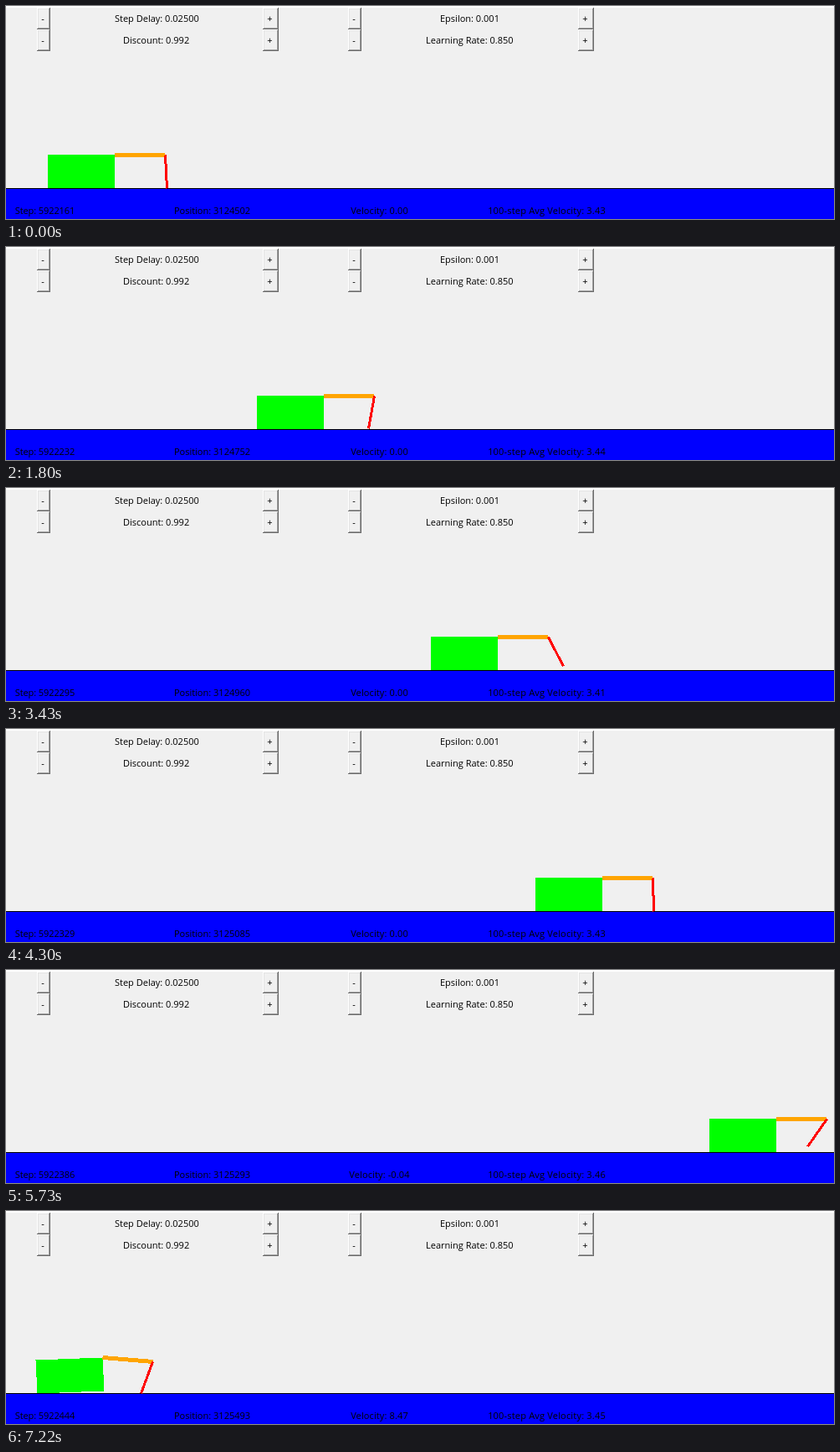
Animation, 990 px wide and 255 px high, one loop 7270 ms. Source, as an HTML page:

```html
<!DOCTYPE html>
<html lang="en">
<head>
<meta charset="utf-8">
<title>Crawling robot</title>
<style>
  html, body { margin: 0; width: 100%; height: 100%; overflow: hidden; background: #f0f0f0; }
  svg { display: block; }
  text { font: 11px "Open Sans", "Noto Sans", sans-serif; fill: #000; white-space: pre; }
  .mid { text-anchor: middle; }
  .crisp { shape-rendering: crispEdges; }
</style>
</head>
<body>
<svg id="stage" width="990" height="255" viewBox="0 0 990 255">
  <rect width="990" height="255" fill="#f0f0f0"/>
  <rect width="990" height="2" fill="#fff"/>
  <g id="buttons" class="crisp"></g>
  <text x="130" y="19">Step Delay: 0.02500</text>
  <text x="519" y="19">Epsilon: 0.001</text>
  <text x="140" y="45">Discount: 0.992</text>
  <text x="502" y="45">Learning Rate: 0.850</text>
  <g class="crisp">
    <rect y="218" width="990" height="37" fill="#00f"/>
    <rect y="218" width="990" height="1"/>
    <!-- just under half a pixel: whole coordinates name pixel centres -->
    <g transform="translate(.49 .49)">
      <polygon id="body" fill="#0f0"/>
      <line id="arm" stroke="#ffa500" stroke-width="5"/>
      <line id="hand" stroke="#f00" stroke-width="3"/>
    </g>
  </g>
  <g class="mid">
    <text id="step" x="46.5" y="249" letter-spacing="-.1"></text>
    <text id="pos" x="246.5" y="249"></text>
    <text id="vel" x="446.5" y="249" letter-spacing=".12"></text>
    <text id="avg" x="646.5" y="249" letter-spacing=".19"></text>
  </g>
</svg>
<script>
const $ = id => document.getElementById(id);
const NS = 'http://www.w3.org/2000/svg';

function add(parent, tag, attrs, text = '') {
  const el = document.createElementNS(NS, tag);
  for (const k in attrs) el.setAttribute(k, attrs[k]);
  el.textContent = text;
  parent.append(el);
}

// Raised buttons
function button(x, y, w, label) {
  const g = $('buttons'), h = 26;
  const box = (near, far, fill) => add(g, 'rect',
    { x: x + near, y: y + near, width: w - near - far, height: h - near - far, fill });
  box(0, 0, '#696969');
  box(0, 1, '#fff');
  box(1, 1, '#a0a0a0');
  box(1, 2, '#e3e3e3');
  box(2, 2, '#f0f0f0');
  add(g, 'text', { x: x + w / 2 - 1, y: y + 17, class: 'mid' }, label);
}
for (const y of [2, 28]) {
  button(37, y, 16, '-');
  button(307, y, 19, '+');
  button(409, y, 16, '-');
  button(684, y, 19, '+');
}

// Robot geometry
const WIDTH = 80, HEIGHT = 40, ARM = 60, HAND = 40;
const GROUND = 218, TRACK = 1004, LEFT = -4;
const FIRST_STEP = 5922161, FIRST_POS = 3124502.4;
const rad = deg => deg * Math.PI / 180;

// One gait cycle: hand swings forward in the air, then pulls with the arm lowered
const gait = [7, 6, 5, 5, 6, 7, 8, 9, 10, 10, 9, 8].map((k, i) => {
  const arm = rad(i >= 3 && i <= 8 ? -7.5 : 0), hand = rad(-12.5 * k);
  const x = WIDTH + ARM * Math.cos(arm) + HAND * Math.cos(hand);
  const y = HEIGHT + ARM * Math.sin(arm) + HAND * Math.sin(hand);
  return { arm, hand, x, y, tilt: y < 0 ? Math.atan(-y / x) : 0 };
});
const N = gait.length;
const phase = n => ((n % N) + N) % N;

function shift(a, b) {
  if (a.y >= 0 && b.y >= 0) return 0;
  const cross = a.x - a.y * (b.x - a.x) / (b.y - a.y);
  const from = a.y < 0 ? Math.hypot(a.x, a.y) : cross;
  const to = b.y < 0 ? Math.hypot(b.x, b.y) : cross;
  return from - to;
}
const moves = gait.map((p, i) => shift(gait[phase(i - 1)], p));
const stride = moves.reduce((a, b) => a + b);
const travelled = n => Math.floor(n / N) * stride +
  moves.slice(1, phase(n) + 1).reduce((a, b) => a + b, 0);

// Smoothed 100-step velocity, settled into its cycle
const avg = [];
for (let n = -600, v = 3.43; n < 0; n++) {
  v = 0.9 * v + 0.1 * (travelled(n) - travelled(n - 99)) / 100;
  avg[phase(n)] = v;
}

// Redraw times: [end ms, equal intervals since the previous entry]
const LOOP = 7270;
const runs = [
  [30, 1], [690, 14], [760, 1], [780, 1], [1440, 14], [1490, 1], [1800, 7],
  [1850, 1], [2180, 7], [2230, 1], [2920, 15], [2970, 1], [3430, 10], [3460, 1],
  [3660, 4], [3760, 1], [4480, 16], [4530, 1], [5190, 14], [5220, 1], [5270, 1],
  [5960, 15], [6010, 1], [6290, 6], [6340, 1], [6620, 6], [6740, 1], [7220, 10]
];
const ticks = [0];
for (const [end, count] of runs) {
  const start = ticks[ticks.length - 1];
  for (let i = 1; i <= count; i++)
    ticks.push(Math.round((start + (end - start) * i / count) / 10) * 10);
}

// Steps done by a given time
const pace = [[0, 0], [760, 29], [1800, 71], [3430, 134], [5190, 203], [6290, 247], [7220, 283]];
function stepAt(t) {
  const i = Math.max(1, pace.findIndex(p => p[0] >= t));
  const [t0, n0] = pace[i - 1], [t1, n1] = pace[i];
  return Math.round(n0 + (n1 - n0) * (t - t0) / (t1 - t0));
}

function setLine(id, [x1, y1], [x2, y2]) {
  const ends = { x1, y1, x2, y2 };
  for (const k in ends) $(id).setAttribute(k, Math.round(ends[k]));
}

function draw(n) {
  const { arm, hand, tilt } = gait[phase(n)];
  const pos = FIRST_POS + travelled(n);
  const go = ([x, y], len, angle) => [x + len * Math.cos(angle), y - len * Math.sin(angle)];

  const rear = [pos % TRACK + LEFT, GROUND];
  const front = go(rear, WIDTH, tilt);
  const rearTop = go(rear, HEIGHT, tilt + Math.PI / 2);
  const shoulder = go(rearTop, WIDTH, tilt);
  const elbow = go(shoulder, ARM, tilt + arm);
  const tip = go(elbow, HAND, tilt + hand);

  $('body').setAttribute('points',
    [rear, front, shoulder, rearTop].map(p => p.map(Math.round)).join(' '));
  setLine('arm', shoulder, elbow);
  setLine('hand', elbow, tip);

  $('step').textContent = 'Step: ' + (FIRST_STEP + n);
  $('pos').textContent = 'Position: ' + pos.toFixed(0);
  $('vel').textContent = 'Velocity: ' + moves[phase(n)].toFixed(2);
  $('avg').textContent = '100-step Avg Velocity: ' + avg[phase(n)].toFixed(2);
}

const begin = performance.now();
let shown = -1;
function frame() {
  const t = (performance.now() - begin) % LOOP;
  let i = ticks.length - 1;
  while (ticks[i] > t) i--;
  const n = stepAt(ticks[i]);
  if (n !== shown) draw(shown = n);
  requestAnimationFrame(frame);
}
frame();
</script>
</body>
</html>
```
